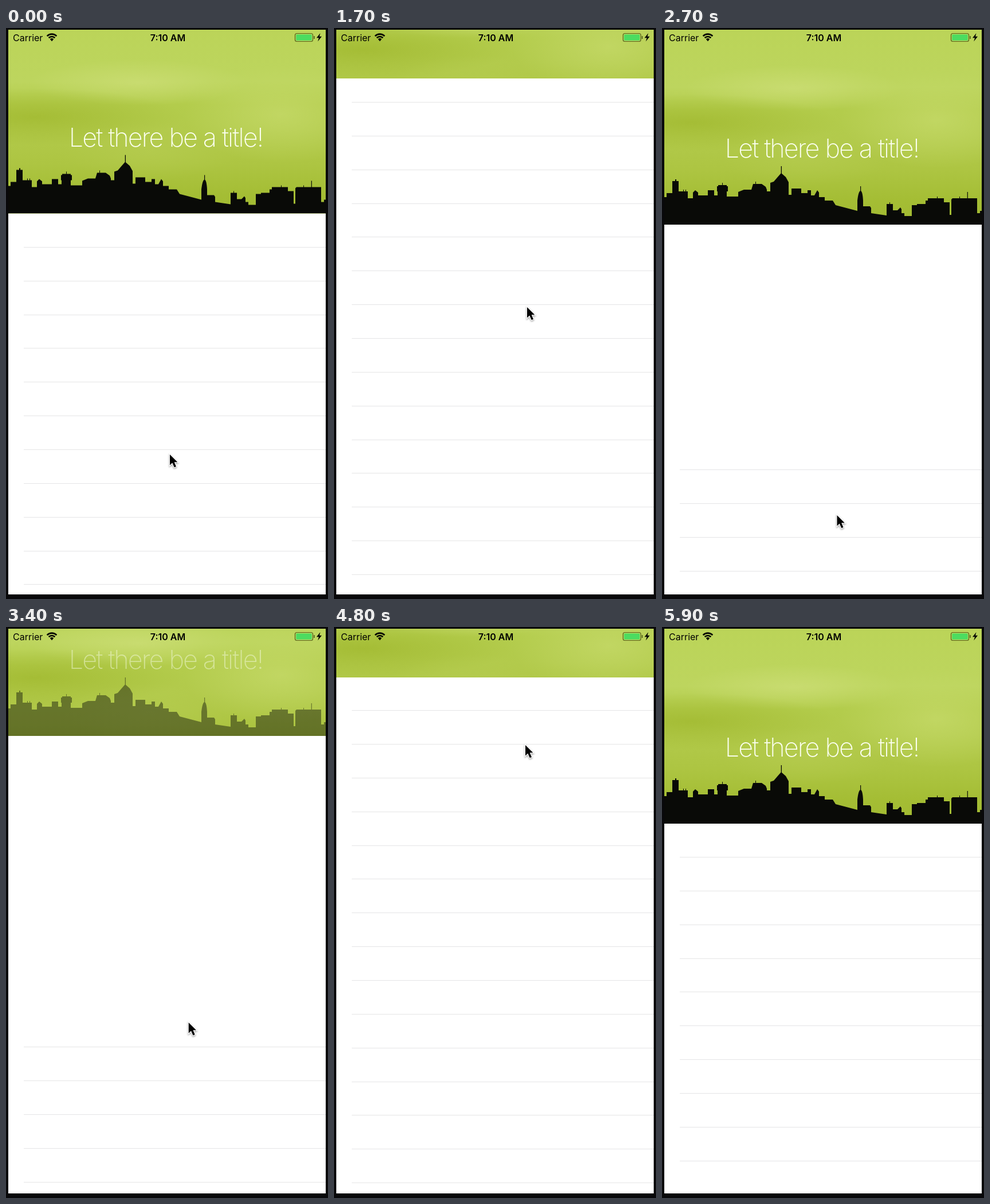
Write an HTML page with a canvas that moves like this. It is 562 by 996 pixels and loops after 6.6 s.

```html
<!DOCTYPE html>
<html lang="en">
<head>
<meta charset="utf-8">
<title>Collapsing header</title>
<style>
  html, body { margin: 0; width: 100%; height: 100%; overflow: hidden; background: #08080a; }
  canvas { display: block; }
</style>
</head>
<body>
<canvas id="stage" width="562" height="996"></canvas>
<script>
const ctx = document.getElementById('stage').getContext('2d');
const LOOP = 6600, STEP = 100, LAST = 5900;
const LEFT = 4, TOP = 3, RIGHT = 558, BOTTOM = 988;
const MIN = 88, MAX = 343, ROW = 58.86, INK = '#090a07';

// Tracks: [time, value] points, linear in between.
const headerTrack = [[0, 323.5], [800, 229.5], [1600, MIN], [2000, MIN], [2100, 168], [2300, MAX],
  [3100, MAX], [3600, MIN], [5000, MIN], [5100, 166], [5300, MAX]];
const rowsTrack = [[0, 323.5], [800, 229.5], [1700, 70.6], [1900, 62], [2000, 88], [2100, 168],
  [2300, 360], [2700, 712], [3000, 800], [3800, 547.6], [4800, 86.7], [4900, 72], [5000, 88],
  [5100, 166], [5300, 343], [5500, 470], [5600, 435], [5700, 385], [5800, 353], [5900, 342.6]];
const cursorX = [[0, 286], [800, 305.5], [1700, 337], [1950, 338], [2700, 305.5], [3000, 302],
  [3800, 335.5], [4800, 334], [5600, 320]];
const cursorY = [[0, 744], [800, 643.5], [1700, 487], [1950, 462], [2700, 850], [3000, 905],
  [3800, 475], [4800, 206], [4950, 190], [5500, 480]];

function valueAt(track, t) {
  const i = track.findIndex(point => point[0] > t);
  if (i < 0) return track[track.length - 1][1];
  const [t0, v0] = track[i - 1], [t1, v1] = track[i];
  return v0 + (v1 - v0) * (t - t0) / (t1 - t0);
}

// The skyline sits on y = 0, the lower edge of the header.
const skyline = [
  'M4 0V-48H8V-55H18V-76H29V-58H45V-46H54V-56L58-60L63-56V-51H80V-60H91V-51H97V-58H96V-67H98V-69H113V-67H115V-58H113V-49H133V-57L143-61H156L159-71H174L181-66L183-61V-58H190V0Z',
  'M189 0V-73L195-75L201-82L208-90L216-83L221-74V-52H226V-63H243V-55H254V-60H260V-51H266L271-60L274-56V-48H284V-42H298L303-34L341-24V0Z',
  'M341 0V-42Q343-59 346.5-59Q350-59 351-42V-32H363L365-29V-20L392-16V-36H403V-25H411L416-30L418-27V-20H423V-15H436V-34H445V-36H460V-42H464V-46H492V-39H502V-17H505V-44L507-46H550V-20H555V-24H558V0Z',
  'M23-79H25V-75H23ZM37-61H38V-57H37ZM41-61H42V-57H41ZM105-73H106V-68H105ZM163-75H164V-70H163ZM207.7-102H209V-88H207.7ZM346-67H347.2V-57H346ZM397-39H398V-35H397ZM480-49H481V-45H480ZM519-49H520V-45H519ZM532.7-57H533.9V-45H532.7Z'
].map(d => new Path2D(d));
const bolt = new Path2D('M548.5 9L542 17.2H546L544.2 23.5L551 14.8H547Z');
const arrow = new Path2D('M0 0V18.5L4.3 14.6L7.7 22.3L11 20.9L7.7 13.3H13.3Z');

function glow(x, y, rx, ry, rgb, alpha) {
  ctx.save();
  ctx.translate(x, y);
  ctx.scale(rx, ry);
  const g = ctx.createRadialGradient(0, 0, 0, 0, 0, 1);
  g.addColorStop(0, `rgba(${rgb},${alpha})`);
  g.addColorStop(1, `rgba(${rgb},0)`);
  ctx.fillStyle = g;
  ctx.fillRect(-1, -1, 2, 2);
  ctx.restore();
}

function drawText(text, x, y, font, color, align = 'left', spacing = '0px') {
  ctx.font = font + ' Inter, sans-serif';
  ctx.letterSpacing = spacing;
  ctx.textAlign = align;
  ctx.fillStyle = color;
  ctx.fillText(text, x, y);
}

function drawSky(header) {
  ctx.save();
  ctx.translate(0, (header - MAX) / 2);
  const g = ctx.createLinearGradient(0, 0, 0, MAX);
  [[0, '#bbd458'], [0.3, '#bdd55e'], [0.42, '#b3cc4c'], [0.55, '#b2ca4b'], [0.72, '#adc542'], [0.88, '#a4bd34'], [1, '#a2ba32']]
    .forEach(stop => g.addColorStop(...stop));
  ctx.fillStyle = g;
  ctx.fillRect(0, 0, 562, 560);
  glow(230, 105, 190, 40, '208,224,124', 0.6);
  glow(50, 165, 260, 50, '160,184,46', 0.75);
  glow(480, 160, 170, 85, '198,218,106', 0.75);
  glow(250, 225, 150, 50, '184,206,84', 0.5);
  ctx.restore();
}

function drawHeader(header) {
  ctx.save();
  ctx.beginPath();
  ctx.rect(LEFT, TOP, RIGHT - LEFT, header - TOP);
  ctx.clip();
  drawSky(header);
  ctx.globalAlpha = Math.min(1, (header - MIN) / 235);
  ctx.translate(0, header);
  ctx.beginPath();
  const city = new Path2D();
  skyline.forEach(part => city.addPath(part));
  ctx.fillStyle = INK;
  ctx.fill(city);
  drawText('Let there be a title!', 279, -117, '200 45px', '#fbfff0', 'center', '-1.9px');
  ctx.restore();
}

function drawStatusBar() {
  drawText('Carrier', 12, 22.5, '400 16px', '#000');
  drawText('7:10 AM', 282.5, 22.5, '600 16px', '#000', 'center');

  ctx.strokeStyle = ctx.fillStyle = '#000';
  ctx.lineWidth = 2.7;
  for (const r of [11.8, 7.5]) {
    ctx.beginPath();
    ctx.arc(80, 22.5, r, -Math.PI * 0.75, -Math.PI * 0.25);
    ctx.stroke();
  }
  ctx.beginPath();
  ctx.moveTo(80, 23.3);
  ctx.arc(80, 22.5, 4.4, -Math.PI * 0.75, -Math.PI * 0.25);
  ctx.fill();

  ctx.strokeStyle = ctx.fillStyle = 'rgba(40,50,0,.7)';
  ctx.lineWidth = 1.2;
  ctx.beginPath();
  ctx.roundRect(504.5, 9.5, 31, 14, 3);
  ctx.stroke();
  ctx.fillRect(537, 14, 1.7, 5);
  ctx.fillStyle = '#4cdc60';
  ctx.beginPath();
  ctx.roundRect(506.3, 11.3, 27.4, 10.4, 1.5);
  ctx.fill();
  ctx.fillStyle = '#000';
  ctx.fill(bolt);
}

function drawCursor(x, y) {
  ctx.save();
  ctx.translate(x, y);
  ctx.shadowColor = 'rgba(0,0,0,.4)';
  ctx.shadowBlur = 3;
  ctx.shadowOffsetY = 1.5;
  ctx.strokeStyle = '#fff';
  ctx.lineWidth = 2.4;
  ctx.stroke(arrow);
  ctx.shadowColor = 'transparent';
  ctx.fillStyle = '#000';
  ctx.fill(arrow);
  ctx.restore();
}

function draw(t) {
  const header = valueAt(headerTrack, t);
  ctx.fillStyle = '#08080a';
  ctx.fillRect(0, 0, 562, 996);
  ctx.fillStyle = '#fff';
  ctx.fillRect(LEFT, TOP, RIGHT - LEFT, BOTTOM - TOP);

  ctx.fillStyle = '#e5e5e6';
  for (let y = valueAt(rowsTrack, t) + ROW; y < BOTTOM - 1; y += ROW) {
    if (y > header) ctx.fillRect(31, Math.floor(y), RIGHT - 31, 1);
  }
  drawHeader(header);
  drawStatusBar();
  if (t <= 5600) drawCursor(valueAt(cursorX, t), valueAt(cursorY, t));
}

function tick() {
  const t = performance.now() % LOOP;
  draw(Math.min(LAST, Math.floor(t / STEP) * STEP));
  requestAnimationFrame(tick);
}
tick();
</script>
</body>
</html>
```
